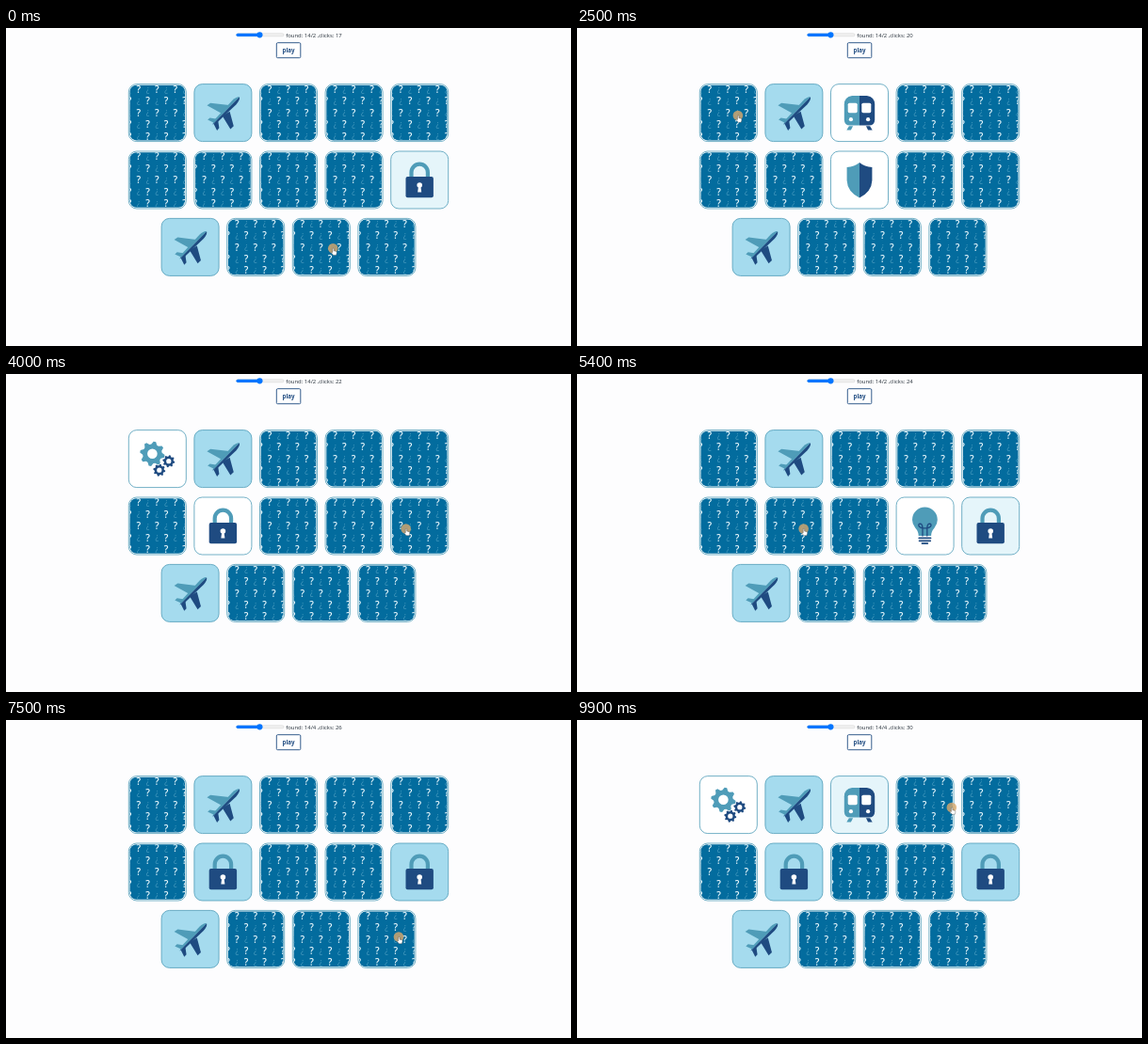
These frames come from a looping animation (600 by 338 pixels, 10000 ms). An HTML page:

```html
<!DOCTYPE html>
<html lang="en">
<head>
<meta charset="utf-8">
<title>Memory game</title>
<style>
html, body { margin: 0; width: 100%; height: 100%; overflow: hidden; background: #fdfdfe; }
svg { display: block; width: 100vw; height: 100vh; }
text { font-family: "Open Sans", "Noto Sans", sans-serif; }
.teal { fill: #4f9cb8; }
.navy { fill: #1f4b81; }
.line { fill: none; stroke: #1f4b81; stroke-linecap: round; }
.flip { transform: translate(61.8px, 0) scale(-1, 1); }
</style>
</head>
<body>
<svg viewBox="0 0 600 338" preserveAspectRatio="none">
  <defs>
    <clipPath id="inner"><rect x="1.6" y="1.6" width="58.6" height="58.6" rx="7"/></clipPath>
    <g id="back">
      <rect x="1.6" y="1.6" width="58.6" height="58.6" rx="7" fill="#036c9e"/>
      <g id="marks" clip-path="url(#inner)" text-anchor="middle"></g>
    </g>
    <g id="plane">
      <g transform="translate(1.8 2) scale(.95)">
        <path class="teal" d="M12.8 22.2L16.6 19.4L37.5 22L29 31ZM13.5 38.3L16 36L24 37.4L20.5 41.5Z"/>
        <path class="navy" d="M38.2 29L42.6 45.3L39 48.8L30 34ZM25.2 39.5L26.4 47.5L24 50.3L20.3 43Z"/>
        <path class="teal" d="M19 43.5L20.5 39L41 16.5Q46.5 11.7 49 12.8Z"/>
        <path class="navy" d="M19 43.5L49 12.8Q50.2 15.5 45.5 21L23.5 42Z"/>
      </g>
    </g>
    <g id="lock">
      <path fill="none" stroke="#4f9cb8" stroke-width="4.2" d="M22.2 29V22.8a8.7 8.7 0 0 1 17.4 0V29"/>
      <rect x="16.2" y="27.3" width="29.4" height="22.3" rx="2" class="navy"/>
      <path fill="#fff" d="M29.8 37L28.9 43.8H32.9L32 37Z"/>
      <circle cx="30.9" cy="36.4" r="2.8" fill="#fff"/>
    </g>
    <g id="train">
      <g id="coach">
        <path d="M30.9 12.7H23Q14.7 14 14.7 22V38Q14.7 44.3 21 44.3H30.9Z"/>
        <path d="M19.8 45H24L21.8 49.3H17.2Z"/>
        <rect x="18.6" y="20.5" width="10" height="10.5" rx="1.6" fill="#fff"/>
        <circle cx="21.8" cy="38" r="2.1" fill="#fff"/>
      </g>
      <use href="#coach" class="flip navy"/>
    </g>
    <g id="shield">
      <path id="plate" d="M30.9 12.3Q25.5 16.5 17.5 17.5V31.5Q18 43.5 30.9 50Z"/>
      <use href="#plate" class="flip navy"/>
    </g>
    <g id="bulb">
      <path class="teal" d="M24 41.5Q24 37 20.5 33Q17.3 29 17.3 24.4A13.4 13.4 0 0 1 44.1 24.4Q44.1 29 40.9 33Q37.4 37 37.4 41.5Z"/>
      <path class="line" stroke-width="1.3" d="M28.3 41.5V33Q28 28.5 25.7 28.5Q23.5 28.7 24.3 31Q25.5 33.2 30.7 33.2Q35.9 33.2 37.1 31Q37.9 28.7 35.7 28.5Q33.4 28.5 33.1 33V41.5"/>
      <path class="line" stroke-width="1.8" d="M24.6 43.8H36.8M24.9 46.7H36.5M27.8 49.5H33.6"/>
    </g>
    <g id="gears"></g>
  </defs>

  <rect width="600" height="338" fill="#fdfdfe"/>
  <rect x="244.6" y="5.8" width="50.4" height="3" rx="1.5" fill="#f1f1f1" stroke="#c4c4c4" stroke-width=".4"/>
  <rect x="244.5" y="5.7" width="25" height="3.2" rx="1.6" fill="#0075ff"/>
  <circle cx="269.4" cy="7.3" r="3.1" fill="#0075ff"/>
  <text id="score" x="297.2" y="10.3" font-size="5.95" fill="#222c36"></text>
  <rect x="287.3" y="15.7" width="25.5" height="16" rx="1.2" fill="#fff" stroke="#1f4b81" stroke-width=".9"/>
  <text x="300" y="26.2" font-size="6.2" font-weight="700" class="navy" text-anchor="middle">play</text>
  <g id="board"></g>
  <g id="cursor">
    <circle r="5.3" fill="#dba96b" opacity=".8"/>
    <path fill="#fff" stroke="#333" stroke-width=".35" d="M-.4 .3Q.4 -.5 1 .3V2.6L3.6 3.2Q4.3 3.6 4 5L3.4 7.2H.3L-1.8 4.5Q-1.6 3.6 -.4 4.3Z"/>
  </g>
</svg>
<script>
const LOOP = 10000, STEP = 100, FADE = 700, SIZE = 61.8;
const NS = "http://www.w3.org/2000/svg";
const $ = id => document.getElementById(id);

function add(parent, tag, attrs, text) {
  const el = document.createElementNS(NS, tag);
  for (const k in attrs) el.setAttribute(k, attrs[k]);
  if (text) el.textContent = text;
  return parent.appendChild(el);
}

// Alternating upright and faint inverted marks; the last row repeats the one above
for (let r = 0; r < 5; r++) {
  for (let c = 0; c < 7; c++) {
    const up = (Math.min(r, 3) + c) % 2 === 1;
    add($("marks"), "text", {
      x: 1.2 + c * 9.75, y: 6.2 + r * 12.4 + (up ? 3.6 : 2.2),
      "font-size": up ? 10.2 : 8.4, "font-weight": up ? 600 : 400,
      fill: up ? "#e2f4fa" : "#4a9cbf"
    }, up ? "?" : "¿");
  }
}

function gear(cx, cy, r, color) {
  const teeth = 8, n = teeth * 4, hole = r * .4;
  const pts = Array.from({ length: n }, (_, i) => {
    const a = (i + .5) / n * 2 * Math.PI, q = i % 4 < 2 ? r : r * .78;
    return `${cx + q * Math.cos(a)} ${cy + q * Math.sin(a)}`;
  });
  const arc = w => `a${hole} ${hole} 0 1 0 ${w} 0`;
  add($("gears"), "path", {
    d: `M${pts.join("L")}ZM${cx - hole} ${cy}${arc(2 * hole)}${arc(-2 * hole)}Z`,
    class: color, "fill-rule": "evenodd"
  });
}
gear(25.5, 25.6, 13.2, "teal");
gear(42.9, 33.5, 6.5, "navy");
gear(32.9, 43, 6.5, "navy");

const icons = { 0: "gears", 1: "plane", 2: "train", 6: "lock", 7: "shield",
  8: "bulb", 9: "lock", 10: "plane", 12: "bulb", 13: "shield" };

const cards = Array.from({ length: 14 }, (_, i) => {
  const row = Math.floor(i / 5);
  const x = (row < 2 ? 129.9 : 164.7) + (i % 5) * 69.6, y = 59.2 + row * 71.4;
  const g = add($("board"), "g", { transform: `translate(${x} ${y})` });
  const box = add(g, "rect", { x: .4, y: .4, width: SIZE - .8, height: SIZE - .8, rx: 8.5,
    stroke: "#4f9cb8", "stroke-width": .8 });
  const back = add(g, "use", { href: "#back" });
  const face = add(g, "use", { href: "#" + icons[i], class: "teal" });
  return { x, y, box, back, face };
});

// Where the pointer goes: time, card, and whether it only passes over
const PASS = true;
const stops = [[-500, 9], [50, 12], [1000, 7], [1800, 2], [2510, 0], [3250, 6], [3800, 9, PASS],
  [4300, 8], [4900, 9], [5410, 6], [6600, 13, PASS], [7000, 9], [7600, 13], [8000, 12],
  [8610, 0], [9400, 2], [10250, 4, PASS]];

function play(t) {
  let open = [], count = 16;
  const found = [1, 10];
  for (const [at, card, pass] of stops) {
    if (at > t) break;
    if (pass) continue;
    count++;
    if (open.length === 2) open = [];
    open.push({ card, at });
    if (open.length === 2 && icons[open[0].card] === icons[card]) {
      found.push(open[0].card, card);
      open = [];
    }
  }
  return { open, found, count };
}

// Ease from card to card, aiming a little right of and below the middle
function pointer(t) {
  const i = stops.findIndex(s => s[0] > t);
  const [t0, a] = stops[i - 1], [t1, b] = stops[i];
  const u = (t - t0) / (t1 - t0), e = u * u * (3 - 2 * u);
  const mix = k => cards[a][k] + (cards[b][k] - cards[a][k]) * e + SIZE / 2;
  return [mix("x") + 10, mix("y") + 3];
}

// Pale blue turning white after a card is opened
function tint(age) {
  const u = Math.min(1, age / FADE);
  return `rgb(${[165, 219, 238].map(v => Math.round(v + (255 - v) * u))})`;
}

function draw(ms) {
  const t = Math.floor(ms % LOOP / STEP) * STEP;
  const { open, found, count } = play(t);
  cards.forEach((c, i) => {
    const shown = open.find(o => o.card === i), done = found.includes(i);
    const up = done || shown;
    c.box.setAttribute("fill", done ? "#a5dbee" : shown ? tint(t - shown.at) : "#fff");
    c.back.setAttribute("display", up ? "none" : "inline");
    c.face.setAttribute("display", up ? "inline" : "none");
  });
  $("score").textContent = `found: 14/${found.length} ,clicks: ${count}`;
  $("cursor").setAttribute("transform", `translate(${pointer(t)})`);
}

const start = performance.now();
function tick() {
  draw(performance.now() - start);
  requestAnimationFrame(tick);
}
tick();
</script>
</body>
</html>
```
